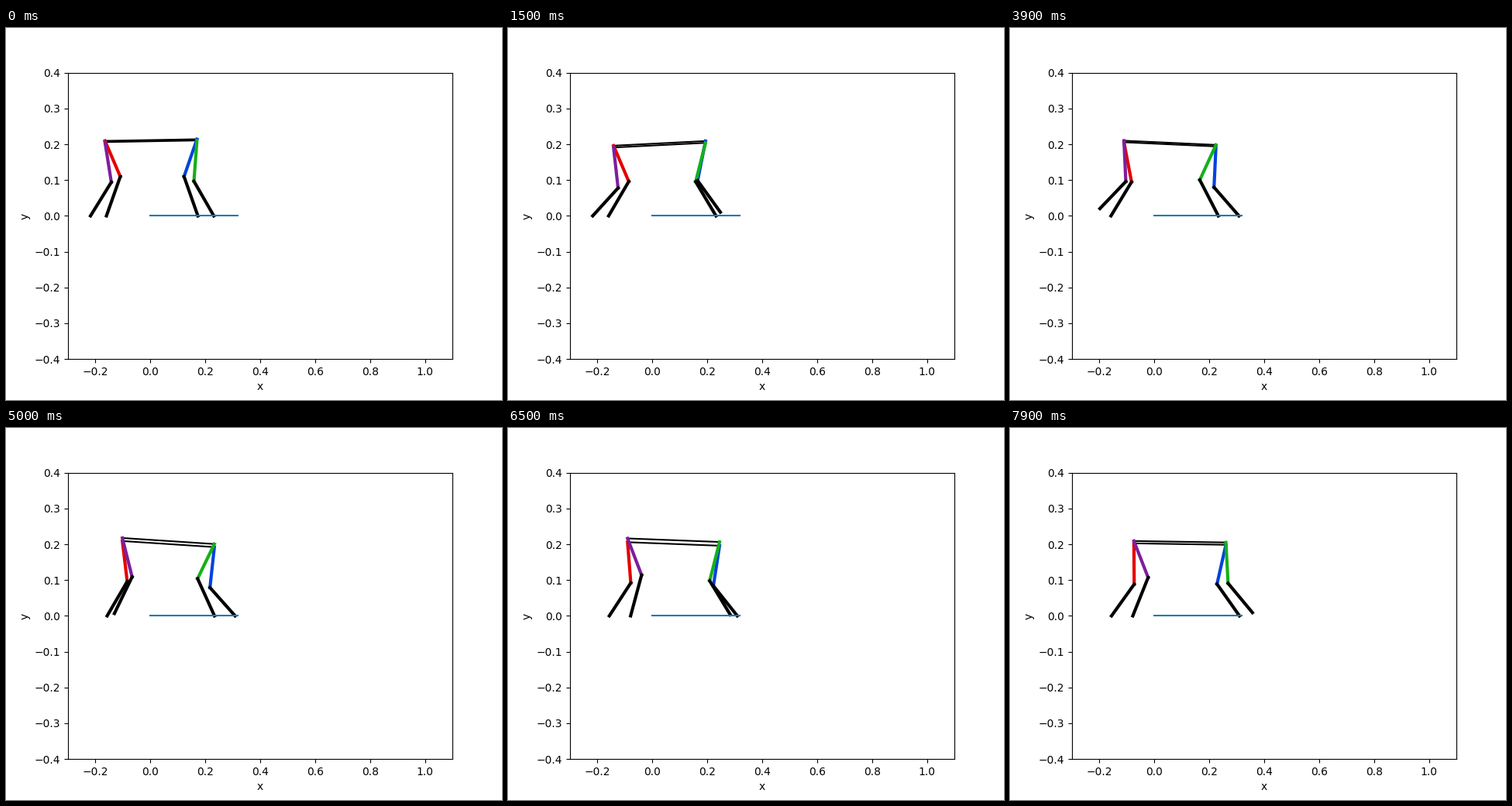
Recreate the animation shown at these times as a matplotlib script. Size 640 by 480 pixels, loop 8 s.

```python
import numpy as np
import matplotlib.pyplot as plt
from matplotlib.animation import FuncAnimation

FRAMES, STEP = 80, 100                   # frame count, ms per frame
BODY, UPPER, LOWER = 335, 114.3, 120.8   # lengths in mm
CREEP = 0.5                              # slip of planted feet, mm/s


def glide(t, *turns):
    """Cosine easing between turning points (time, value)."""
    for (t0, a), (t1, b) in zip(turns, turns[1:]):
        if t <= t1:
            break
    p = np.clip((t - t0) / (t1 - t0), 0, 1)
    return a + (b - a) * (1 - np.cos(np.pi * p)) / 2


def pose(t):
    """Rear hip x and y, rise towards the front, rise of the near side."""
    x = -161.4 + 11.7 * t - 6.1 * np.sin(0.74 * (t - 5.2))
    y = glide(t, (0, 209.5), (1.7, 195.5), (5, 209), (8, 202.5))
    pitch = glide(t, (0, 4.5), (1.4, 13.2), (2.8, -4.5), (4.8, -17), (8, -4))
    roll = glide(t, (0, -3.5), (1.2, -5.8), (2.7, 2), (6.2, 10.8), (8, 6.5))
    return x, y, pitch, roll


def foot(t, start, end, x0, x1, lift, push, skew):
    """One step from x0 to x1; push bends the pace, skew shifts the peak."""
    p = np.clip((t - start) / (end - start), 0, 1)
    return np.array([x0 + (x1 - x0) * p ** push + CREEP * t,
                     lift * np.sin(np.pi * p ** skew)])


def knee(top, end, bend):
    """Joint of the two links between top and end, bent to one side."""
    d = end - top
    r = np.hypot(*d)
    along = (UPPER ** 2 - LOWER ** 2 + r * r) / (2 * r)
    off = np.sqrt(max(UPPER ** 2 - along ** 2, 0))
    return top + (along * d + bend * off * np.array([-d[1], d[0]])) / r


# colour, front, near, step
LEGS = [
    ("red", 0, 0, dict(start=8, end=10.7, x0=-160, x1=-27, lift=10, push=1, skew=1)),
    ("blue", 1, 0, dict(start=0, end=2.7, x0=173, x1=306, lift=10.5, push=1, skew=1)),
    ("purple", 0, 1, dict(start=2.7, end=5.5, x0=-218, x1=-82.5, lift=23, push=2.4, skew=0.5)),
    ("green", 1, 1, dict(start=5.4, end=8.1, x0=231, x1=364, lift=15, push=1.1, skew=3)),
]

fig, ax = plt.subplots(figsize=(6.4, 4.8), dpi=100)
ax.set(xlim=(-0.3, 1.1), ylim=(-0.4, 0.4), xlabel="x", ylabel="y")

sides = [ax.plot([], [], color="black", lw=1.5)[0] for _ in range(2)]
thighs = [ax.plot([], [], color="xkcd:" + leg[0], lw=3)[0] for leg in LEGS]
shins = [ax.plot([], [], color="black", lw=3)[0] for _ in LEGS]
ax.plot([0, 0.318], [0, 0], color="tab:blue", lw=1.5)


def link(line, a, b):
    line.set_data([a[0] / 1000, b[0] / 1000], [a[1] / 1000, b[1] / 1000])


def draw(n):
    t = n * STEP / 1000
    x, y, pitch, roll = pose(t)

    def hip(front, near):
        return np.array([x + BODY * front, y + pitch * front + roll * near])

    for near, line in enumerate(sides):
        link(line, hip(0, near), hip(1, near))
    for (_, front, near, step), thigh, shin in zip(LEGS, thighs, shins):
        top, end = hip(front, near), foot(t, **step)
        mid = knee(top, end, -1 if front else 1)
        link(thigh, top, mid)
        link(shin, mid, end)
    return sides + thighs + shins


anim = FuncAnimation(fig, draw, frames=FRAMES, interval=STEP, repeat=True)
plt.show()
```
